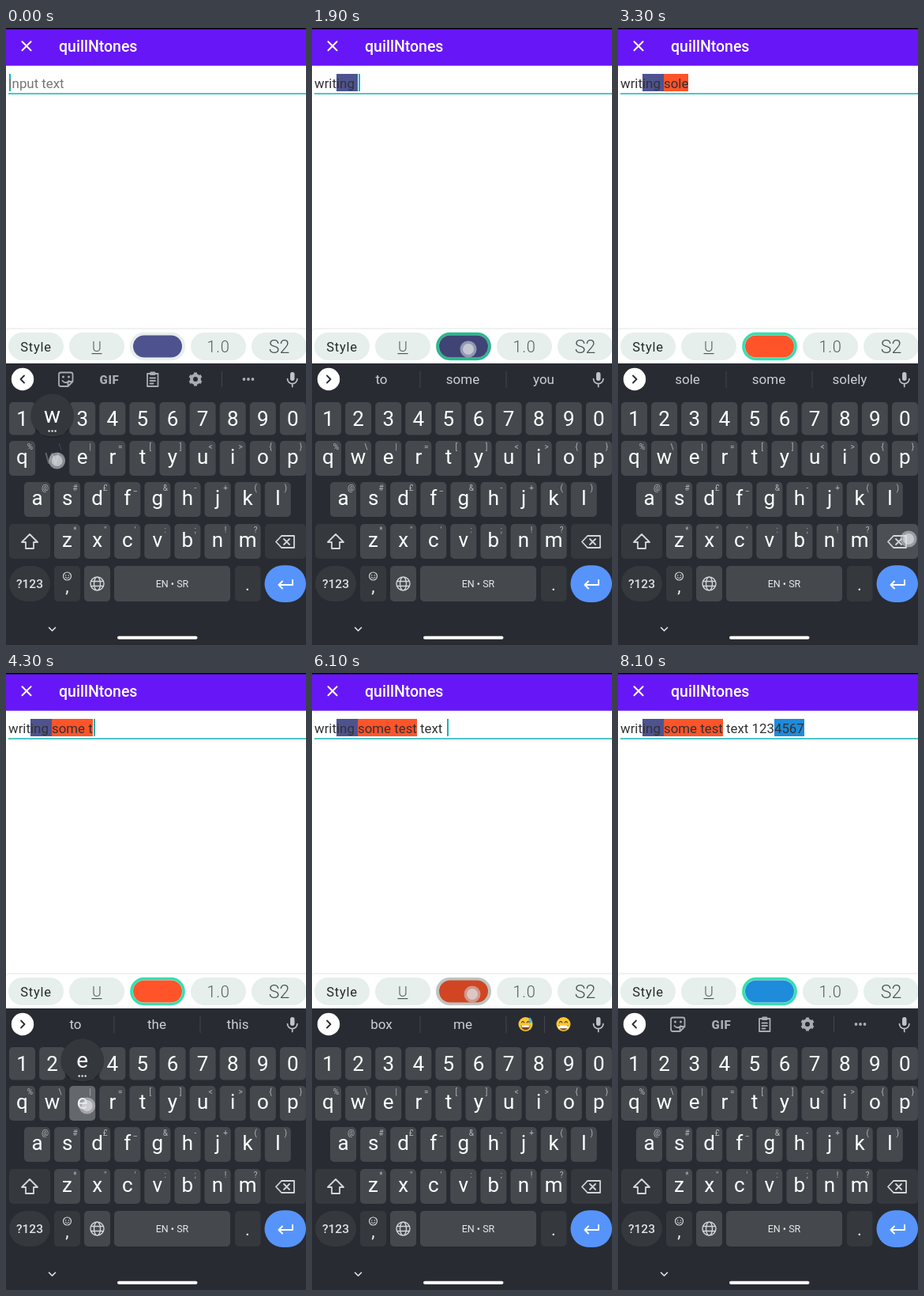
These frames come from a looping animation (380x780 px, 8.2 s). An HTML page:

```html
<!DOCTYPE html>
<html lang="en">
<head>
<meta charset="utf-8">
<title>Text styling</title>
<style>
html, body { margin: 0; width: 100%; height: 100%; overflow: hidden; background: #fff; }
body { position: relative; }
svg { position: absolute; left: 0; top: 0; display: block; }
text { font-family: Roboto, sans-serif; text-anchor: middle; }
.line { fill: none; stroke-linecap: round; stroke-linejoin: round; }
#field { position: absolute; left: 3px; top: 58px; height: 22px; font: 16.85px/22px Roboto, sans-serif; color: #303234; white-space: pre; display: flex; }
#field span { display: block; height: 22px; padding-top: 1px; box-sizing: border-box; }
#field .hint { color: #757575; }
#caret { width: 2px; height: 22px; margin: 0 -3px 0 1px; background: #16b3b7; }
</style>
</head>
<body>
<svg id="stage" width="380" height="780" viewBox="0 0 380 780"></svg>
<div id="field"></div>
<svg id="over" width="380" height="780" viewBox="0 0 380 780"></svg>
<script>
const LOOP = 8200;
const COLORS = ['#4e538f', '#ff5429', '#1e8bdb'];
const stage = document.getElementById('stage');
const over = document.getElementById('over');
const field = document.getElementById('field');

function add(parent, tag, attrs, label) {
  const el = document.createElementNS('http://www.w3.org/2000/svg', tag);
  for (const name in attrs) el.setAttribute(name, attrs[name]);
  if (label !== undefined) el.textContent = label;
  parent.append(el);
  return el;
}
const box = (p, x, y, width, height, rx, fill) => add(p, 'rect', { x, y, width, height, rx, fill });
const disc = (p, cx, cy, r, fill) => add(p, 'circle', { cx, cy, r, fill });
const label = (p, x, y, size, fill, str, more) =>
  add(p, 'text', { x, y, 'font-size': size, fill, ...more }, str);
const line = (p, d, stroke, width = 2, more) =>
  add(p, 'path', { d, stroke, 'stroke-width': width, class: 'line', ...more });
const group = (p) => add(p, 'g', {});
const show = (el, on) => { el.style.display = on ? '' : 'none'; };

// App bar, input line and style chips
box(stage, 0, 0, 380, 2, 0, '#000');
box(stage, 0, 1.5, 380, 46.2, 0, '#6717f7');
line(stage, 'M20.5 17.2l11 11m0-11l-11 11', '#fff', 2);
label(stage, 67, 30, 19.5, '#fff', 'quillNtones', { 'font-weight': 500, style: 'text-anchor:start' });
box(stage, 3, 82.3, 377, 1.5, 0, '#16b3b7');
box(stage, 0, 379, 390, 50, 4, '#f0f1f1');
box(stage, 0, 381, 390, 48, 4, '#fff');
for (let i = 0; i < 5; i++) box(stage, 3 + i * 77, 385, 70, 35, 17.5, '#e6efec');
label(stage, 38, 409, 16.5, '#26292a', 'Style', { 'letter-spacing': .7 });
label(stage, 115, 409, 18, '#555b5c', 'U', { 'font-weight': 300 });
box(stage, 108.5, 411, 13, 1.2, 0, '#555b5c');
label(stage, 269, 410, 20, '#555b5c', '1.0', { 'font-weight': 300, 'letter-spacing': .6 });
label(stage, 346, 411, 23, '#4b5152', 'S2', { 'font-weight': 300 });

const ring = box(stage, 159, 386.5, 66, 32, 16, '#f7faf9');
ring.setAttribute('stroke-width', 3.5);
const swatch = box(stage, 161, 388.5, 62, 28, 14, COLORS[0]);
const shade = box(stage, 157, 385, 70, 35, 17.5, '#000');
shade.setAttribute('opacity', .18);

// Keyboard
box(stage, 0, 424, 380, 356, 0, '#282b31');
const keys = {};
function addKey(name, x, y, w, h, fill, rx = 5) {
  const g = group(stage);
  const rect = box(g, x, y, w, h, rx, fill);
  return keys[name] = { g, rect, fill, x: x + w / 2, y: y + h / 2 };
}
function addRow(chars, hints, x0, y, h, base) {
  [...chars].forEach((ch, i) => {
    const x = x0 + i * 38.1;
    const { g } = addKey(ch, x - 16.5, y, 33, h, '#45494d');
    label(g, x, base, 26, '#fff', ch);
    if (hints[i]) label(g, x + 10, y + 11, 10, '#b2b5b9', hints[i]);
  });
}
addRow('1234567890', '', 20.5, 473, 41.5, 503);
addRow('qwertyuiop', '%\\|=[]<>{}', 20.5, 522, 44, 551);
addRow('asdfghjkl', '@#£_&-+()', 39.5, 574, 44, 603);
addRow('zxcvbnm', '*"\':;!?', 77.5, 627, 44, 656);

const shift = addKey('shift', 4, 627, 52, 44, '#35383d').g;
line(shift, 'M30 640l10 10h-5v8h-10v-8h-5z', '#d4d6d8', 1.8);
const back = addKey('<', 328, 627, 52, 44, '#35383d').g;
line(back, 'M349 642h16v15h-16l-7-7.5zM352 646l7 7m0-7l-7 7', '#d4d6d8', 1.8);

const sym = addKey('sym', 4, 680, 52, 45, '#35383d', 22.5).g;
label(sym, 30, 708, 15.5, '#dfe1e3', '?123', { 'font-weight': 500 });
const comma = addKey(',', 61, 680, 33, 45, '#35383d').g;
add(comma, 'circle', { cx: 77.5, cy: 693, r: 5, fill: 'none', stroke: '#d4d6d8', 'stroke-width': 1.2 });
disc(comma, 75.7, 692, .8, '#d4d6d8');
disc(comma, 79.3, 692, .8, '#d4d6d8');
line(comma, 'M75 694.5q2.5 2.5 5 0', '#d4d6d8', 1);
label(comma, 77.5, 713, 22, '#f1f2f3', ',');
const globe = addKey('globe', 99, 680, 33, 45, '#45494d').g;
line(globe, 'M107 702.5a8.5 8.5 0 1 0 17 0a8.5 8.5 0 1 0-17 0M111.5 702.5a4 8.5 0 1 0 8 0a4 8.5 0 1 0-8 0M108 699.5h15M108 705.5h15', '#d4d6d8', 1.4);
const space = addKey(' ', 137, 680, 147, 45, '#45494d').g;
label(space, 210.5, 707, 12.5, '#e6e7e8', 'EN • SR');
const dot = addKey('.', 290, 680, 32.5, 45, '#35383d').g;
label(dot, 306, 711, 22, '#f1f2f3', '.');
const enter = addKey('enter', 327.5, 679.3, 52.5, 46.7, '#5694fb', 23.3).g;
line(enter, 'M363 698v6h-17m4-4.5l-4.5 4.5l4.5 4.5', '#fff', 2);
line(stage, 'M54.5 758l4 4l4-4', '#e6e7e8', 1.6);
box(stage, 141, 768.8, 101.5, 4, 2, '#fff');

// Strip above the keys
disc(stage, 21, 444, 14.2, '#fff');
const chevron = line(stage, '', '#282b31', 1.8);
const grey = '#a9adb2';
box(stage, 360, 435, 5.5, 11, 2.7, '#c0c3c7');
line(stage, 'M356.5 443.5a6.2 6.2 0 0 0 12.4 0M362.7 450v3.5', '#c0c3c7', 1.7);

const tools = group(stage);
line(tools, 'M67 438a2.5 2.5 0 0 1 2.5-2.5h12.5a2.5 2.5 0 0 1 2.5 2.5v9l-6 6h-9a2.5 2.5 0 0 1-2.5-2.5zM84.5 447h-6v6M71.5 446q4 4.5 8 0', grey, 1.8);
disc(tools, 72.5, 441, 1.5, grey);
disc(tools, 79.5, 441, 1.5, grey);
label(tools, 131, 449.5, 15, grey, 'GIF', { 'font-weight': 900, 'letter-spacing': .6 });
line(tools, 'M179 437h13.5v16h-13.5zM182.5 442.5h6.5M182.5 446h6.5M182.5 449.5h4', grey, 1.8);
box(tools, 182, 434.5, 7.5, 4.5, 1.5, grey);
add(tools, 'circle', { cx: 240, cy: 444, r: 5, fill: 'none', stroke: grey, 'stroke-width': 4 });
for (let a = 0; a < 360; a += 60)
  add(tools, 'rect', { x: 238, y: 435.5, width: 4, height: 4, fill: grey, transform: `rotate(${a} 240 444)` });
box(tools, 273, 434, 1, 20, 0, '#42464b');
for (const x of [301.5, 307, 312.5]) disc(tools, x, 444, 1.9, grey);

const words = group(stage);
const slots = [88, 191, 293.5].map(x => label(words, x, 450, 17, '#cccfd3', ''));
box(words, 136.5, 434, 1, 21, 0, '#42464b');
box(words, 245.5, 434, 1, 21, 0, '#42464b');

const faces = group(stage);
box(faces, 294, 434, 1, 21, 0, '#42464b');
for (const x of [270.5, 318.5]) {
  disc(faces, x, 444, 9, '#fcc832');
  line(faces, `M${x - 5} 442q1.7-3 3.4 0m3.2 0q1.7-3 3.4 0`, '#6b4a1a', 1.3);
  add(faces, 'path', { d: `M${x - 6} 445h12q-1 6.5-6 6.5t-6-6.5z`, fill: '#7a4a22' });
  add(faces, 'path', { d: `M${x - 5.3} 445.3h10.6l-.7 2.5h-9.2z`, fill: '#fff' });
}
add(faces, 'path', { d: 'M276 435q4 5 2.6 6.6q-2.4 1.6-4-.6q-.6-2 1.4-6z', fill: '#4fb0ee' });
line(faces, 'M313 448h11', '#fff', 2.4);

// Key preview and finger
const popup = group(over);
disc(popup, 0, 1, 27.5, 'rgba(0,0,0,.2)');
disc(popup, 0, 0, 27, '#34373c');
const popupText = label(popup, 0, 9, 28, '#fff', '');
for (const x of [-4, 0, 4]) disc(popup, x, 20, 1.2, '#e6e7e8');
const finger = group(over);
disc(finger, 0, 0, 10.5, 'rgba(205,207,214,.6)');
disc(finger, 0, 0, 7, 'rgba(235,236,240,.55)');

// "T" toggles the style, "C" holds the chip to change its colour
const script = [];
const press = (seq, ...times) => [...seq].forEach((key, i) => {
  const len = key === 'C' ? 300 : 100;
  script.push({ key, down: times[i], up: times[i] + len });
});
press('writT', 0, 200, 400, 500, 700);
press('ing TCT', 1000, 1200, 1400, 1700, 1900, 2050, 2400);
press('sole<<', 2600, 2700, 2800, 2900, 3300, 3500);
press('me testT', 3600, 3800, 4000, 4200, 4300, 4500, 4700, 5000);
press(' text C', 5200, 5400, 5500, 5600, 5800, 5900, 6100);
press('123T4567', 6800, 7000, 7100, 7300, 7400, 7500, 7600, 7700);

const GUESSES = {
  'w': 'we what was', 'wr': 'write wrong wrote', 'wri': 'write writing written', 'writ': 'writ write writing',
  'writi': 'writing written write', 'writin': 'writing writings written', 'writing': 'writing writings written',
  'writing ': 'to some you', 's': 'so some she', 'so': 'so some soon', 'sol': 'sol sold some',
  'sole': 'sole some solely', 'som': 'some son something', 'some': 'some someone something',
  'some ': 'of more time', 't': 'to the this', 'te': 'te the tell', 'tes': 'tes test yes',
  'test': 'test rest tests', 'test ': 'to and for', 'tex': 'tex text texts', 'text': 'text texts test',
  'text ': 'box me'
};

function stateAt(t) {
  const s = { chars: [], on: false, color: 0, edit: 0, held: null };
  for (const e of script) {
    if (t >= e.down && t < e.up) s.held = e;
    if (t < e.up) break;
    if (e.key === 'T') s.on = !s.on;
    else if (e.key === 'C') s.color++;
    else {
      if (e.key === '<') s.chars.pop();
      else s.chars.push({ ch: e.key, bg: s.on ? COLORS[s.color] : '' });
      s.edit = e.up;
    }
  }
  return s;
}

function drawField(s, t) {
  field.textContent = '';
  const span = (str, bg, cls = '') => {
    const el = document.createElement('span');
    el.textContent = str;
    el.style.background = bg;
    el.className = cls;
    field.append(el);
  };
  let run = '', bg = '';
  for (const c of s.chars) {
    if (c.bg !== bg && run) { span(run, bg); run = ''; }
    bg = c.bg;
    run += c.ch;
  }
  if (run) span(run, bg);
  if ((t - s.edit) % 500 < 200) {
    const caret = document.createElement('i');
    caret.id = 'caret';
    field.append(caret);
  }
  if (!s.chars.length) span('Input text', '', 'hint');
}

function drawStrip(text) {
  const word = (text.match(/\S+ ?$/) || [''])[0];
  const guess = GUESSES[word];
  const list = guess ? guess.split(' ') : [];
  show(tools, !guess);
  show(words, guess);
  show(faces, list.length === 2);
  slots.forEach((el, i) => { el.textContent = list[i] || ''; });
  chevron.setAttribute('d', guess ? 'M19 439.5l4.5 4.5l-4.5 4.5' : 'M23 439.5l-4.5 4.5l4.5 4.5');
}

function pressedFill(name) {
  if (name === '<') return '#4c5055';
  return name === ' ' ? '#565a5e' : '#64686c';
}

function drawTouch(s, t) {
  const held = s.held && s.held.key;
  const chip = held === 'T' || held === 'C';
  const key = keys[held];
  for (const name in keys) {
    const k = keys[name];
    const first = k === key && t < 100;
    k.g.setAttribute('opacity', first ? .25 : 1);
    k.rect.setAttribute('fill', k !== key ? k.fill : first ? '#282b31' : pressedFill(name));
  }
  show(shade, chip);
  show(finger, held);
  show(popup, key && /\w/.test(held));
  if (!held) return;
  let x = chip ? 198 : key.x + 6, y = chip ? 406 : key.y + 3;
  if (held === 'C') x = 203;
  if (held === '<') { x = 368; y = 646; }
  if (held === ' ') { x = 198; y = 713; }
  finger.setAttribute('transform', `translate(${x} ${y})`);
  if (key) {
    popup.setAttribute('transform', `translate(${Math.min(353, Math.max(26.5, key.x))} ${key.y - 54.5})`);
    popupText.textContent = held;
  }
}

let last = -1;
function frame(now) {
  const t = Math.floor(now % LOOP / 100) * 100;
  if (t !== last) {
    last = t;
    const s = stateAt(t);
    drawField(s, t);
    drawStrip(s.chars.map(c => c.ch).join(''));
    swatch.setAttribute('fill', COLORS[s.color]);
    ring.setAttribute('stroke', s.on ? '#35dfb0' : '#e6efec');
    drawTouch(s, t);
  }
  requestAnimationFrame(frame);
}
frame(0);
</script>
</body>
</html>
```
